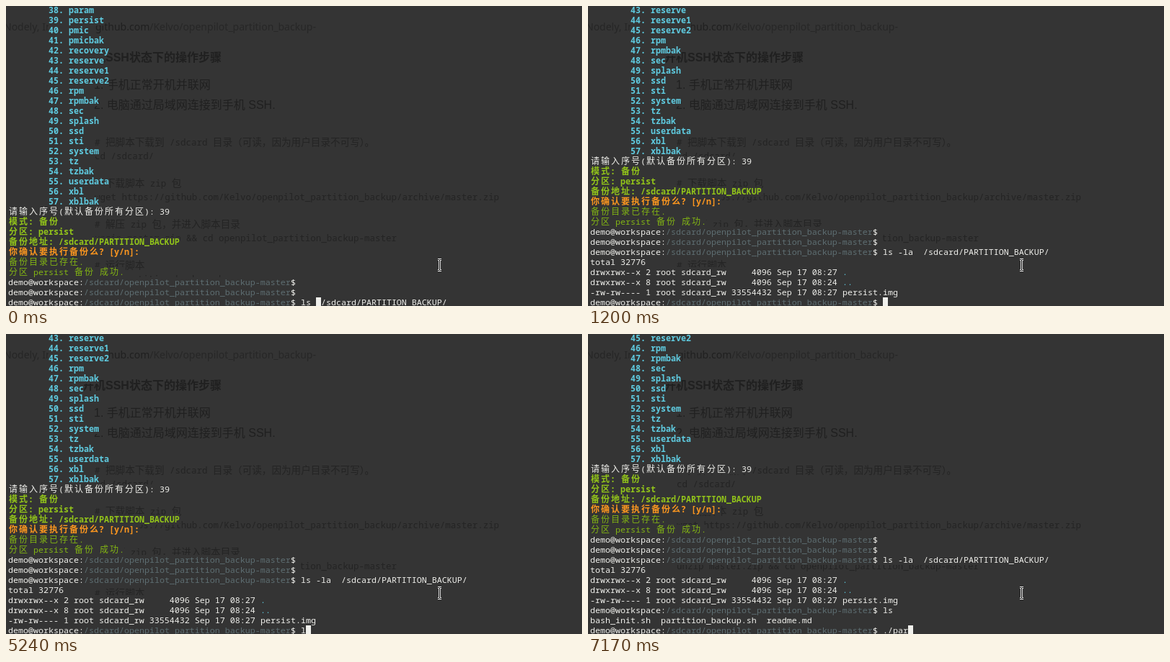
These frames come from a looping animation (799x417 px, 8000 ms). An HTML page with a canvas:

```html
<!DOCTYPE html>
<html lang="zh">
<head>
<meta charset="utf-8">
<title>Terminal session</title>
<style>
  html, body { margin: 0; width: 100%; height: 100%; overflow: hidden; background: #343434; }
  canvas { display: block; }
</style>
</head>
<body>
<canvas id="stage" width="799" height="417"></canvas>
<script>
const ctx = document.getElementById('stage').getContext('2d');

const LOOP = 8000;
const CELL = 7, ROW = 14, LEFT = 3, TOP = -1, ROWS = 30;
const BG = '#343434', WHITE = '#f0f0ec', PATH = '#5e6e72';
const CYAN = '#5fcbe0', GREEN = '#92c41a', DIM_GREEN = '#82b414', ORANGE = '#fd971f';
const MONO = '"Noto Sans Mono", "DejaVu Sans Mono", monospace';
const CJK = '"Noto Sans CJK SC", "Noto Sans CJK", sans-serif';
const SANS = '"Liberation Sans", "Noto Sans CJK SC", "Noto Sans CJK", sans-serif';
const WIDE = /[\u2e80-\u9fff\uff00-\uffef]/;

// A line is a list of spans: [text, colour, bold]
const span = (text, color = WHITE, bold = false) => [text, color, bold];
const prompt = (cmd = '') => [
  span('demo@workspace:'),
  span('/sdcard/openpilot_partition_backup-master', PATH),
  span('$ ' + cmd)
];
const listing = (perms, links, size, time, name, color) => [
  span(`${perms} ${links} root sdcard_rw ${String(size).padStart(8)} Sep 17 ${time} `),
  span(name, color)
];

const partitions = ('param persist pmic pmicbak recovery reserve reserve1 reserve2 rpm rpmbak ' +
  'sec splash ssd sti system tz tzbak userdata xbl xblbak').split(' ');

const intro = [
  ...partitions.map((name, i) => [span(`        ${i + 38}. ${name}`, CYAN, true)]),
  [span('请输入序号(默认备份所有分区): 39')],
  [span('模式: 备份', GREEN, true)],
  [span('分区: persist', GREEN, true)],
  [span('备份地址: /sdcard/PARTITION_BACKUP', GREEN, true)],
  [span('你确认要执行备份么? [y/n]:', ORANGE, true)],
  [span('备份目录已存在.', DIM_GREEN)],
  [span('分区 persist 备份 成功.', DIM_GREEN)],
  prompt(),
  prompt()
];
const TARGET = ' /sdcard/PARTITION_BACKUP/';
const listed = [
  ...intro,
  prompt('ls -la ' + TARGET),
  [span('total 32776')],
  listing('drwxrwx--x', 2, 4096, '08:27', '.', CYAN),
  listing('drwxrwx--x', 8, 4096, '08:24', '..', CYAN),
  listing('-rw-rw----', 1, 33554432, '08:27', 'persist.img', WHITE)
];
const finished = [
  ...listed,
  prompt('ls'),
  [span('bash_init.sh  partition_backup.sh  readme.md')]
];

// [start ms, history, typed before the cursor, rest after it]
const steps = [
  [0, intro, 'ls ', TARGET],
  [600, intro, 'ls -', TARGET],
  [750, intro, 'ls -l', TARGET],
  [900, intro, 'ls -la', TARGET],
  [1050, intro, 'ls -la ', TARGET],
  [1200, listed, '', ''],
  [4640, listed, 'l', ''],
  [4940, listed, '', ''],
  [5240, listed, 'l', ''],
  [5380, finished, '', ''],
  [5830, finished, '.', ''],
  [6280, finished, './', ''],
  [7030, finished, './pa', ''],
  [7170, finished, './par', '']
];

const runs = text => text.match(/[\u2e80-\u9fff\uff00-\uffef]+|[^\u2e80-\u9fff\uff00-\uffef]+/g) || [];
const cells = text => [...text].reduce((n, ch) => n + (WIDE.test(ch) ? 2 : 1), 0);

function write(text, x, y, font, color) {
  ctx.font = font;
  ctx.fillStyle = color;
  ctx.fillText(text, x, y);
  return ctx.measureText(text).width;
}

// Page showing faintly through the terminal
function code(text, y) {
  let x = 123;
  for (const run of runs(text)) {
    const font = WIDE.test(run) ? '13.6px ' + CJK : '12.47px ' + MONO;
    x += write(run, x, y, font, '#242424');
  }
}

function drawPage() {
  const dark = '#202020', url = '14px "Noto Sans", "Open Sans", sans-serif';
  write('Nodely, Inc. [US]', -3, 34, url, '#262626');
  const host = write('github.com', 124, 34, url, dark);
  write('/Kelvo/openpilot_partition_backup-', 124 + host, 34, url, '#272727');
  write('开机SSH状态下的操作步骤', 106, 77, 'bold 16px ' + SANS, dark);
  write('1. 手机正常开机并联网', 122, 115, '16px ' + SANS, dark);
  write('2. 电脑通过局域网连接到手机 SSH.', 122, 143, '16px ' + SANS, dark);
  code('# 把脚本下载到 /sdcard 目录（可读，因为用户目录不可写）。', 194);
  code('cd /sdcard/', 213);
  code('# 下载脚本 zip 包', 251);
  code('wget https://github.com/Kelvo/openpilot_partition_backup/archive/master.zip', 270);
  code('# 解压 zip 包，并进入脚本目录', 308);
  code('unzip master.zip && cd openpilot_partition_backup-master', 327);
  code('# 运行脚本', 365);
  code('bash partition_backup.sh', 384);
}

function drawLine(line, row) {
  const top = TOP + row * ROW, base = top + 11;
  const text = line.map(s => s[0]).join('');
  const indent = text.length - text.trimStart().length;
  ctx.fillStyle = BG;
  ctx.fillRect(LEFT + indent * CELL, top, (cells(text) - indent) * CELL, ROW);

  let x = LEFT;
  for (const [str, color, bold] of line) {
    const weight = bold ? 'bold ' : '';
    for (const run of runs(str)) {
      if (WIDE.test(run)) {
        [...run].forEach((ch, i) => write(ch, x + i * 2 * CELL + 1, base, weight + '12px ' + CJK, color));
      } else {
        write(run, x, base, `${weight}${CELL / 0.6}px ${MONO}`, color);
      }
      x += cells(run) * CELL;
    }
  }
}

function drawPointer(x, y) {
  const beam = new Path2D(
    `M${x - 2.5} ${y - 7.5}h2l.5 1l.5 -1h2M${x} ${y - 7}v14M${x - 2.5} ${y + 7.5}h2l.5 -1l.5 1h2`);
  for (const [color, width] of [['#f4f4f4', 2.8], ['#111', 1]]) {
    ctx.strokeStyle = color;
    ctx.lineWidth = width;
    ctx.stroke(beam);
  }
}

function draw(t) {
  const [, history, typed, rest] = steps.filter(s => s[0] <= t).pop();
  ctx.fillStyle = BG;
  ctx.fillRect(0, 0, 799, 417);
  drawPage();

  const lines = [...history, prompt(typed + rest)].slice(-ROWS);
  lines.forEach(drawLine);

  const column = cells(prompt(typed).map(s => s[0]).join(''));
  ctx.fillStyle = WHITE;
  ctx.fillRect(LEFT + column * CELL, TOP + (ROWS - 1) * ROW, CELL, ROW);
  drawPointer(601.5, 360);
}

const begin = performance.now();
function tick() {
  draw((performance.now() - begin) % LOOP);
  requestAnimationFrame(tick);
}
tick();
</script>
</body>
</html>
```
